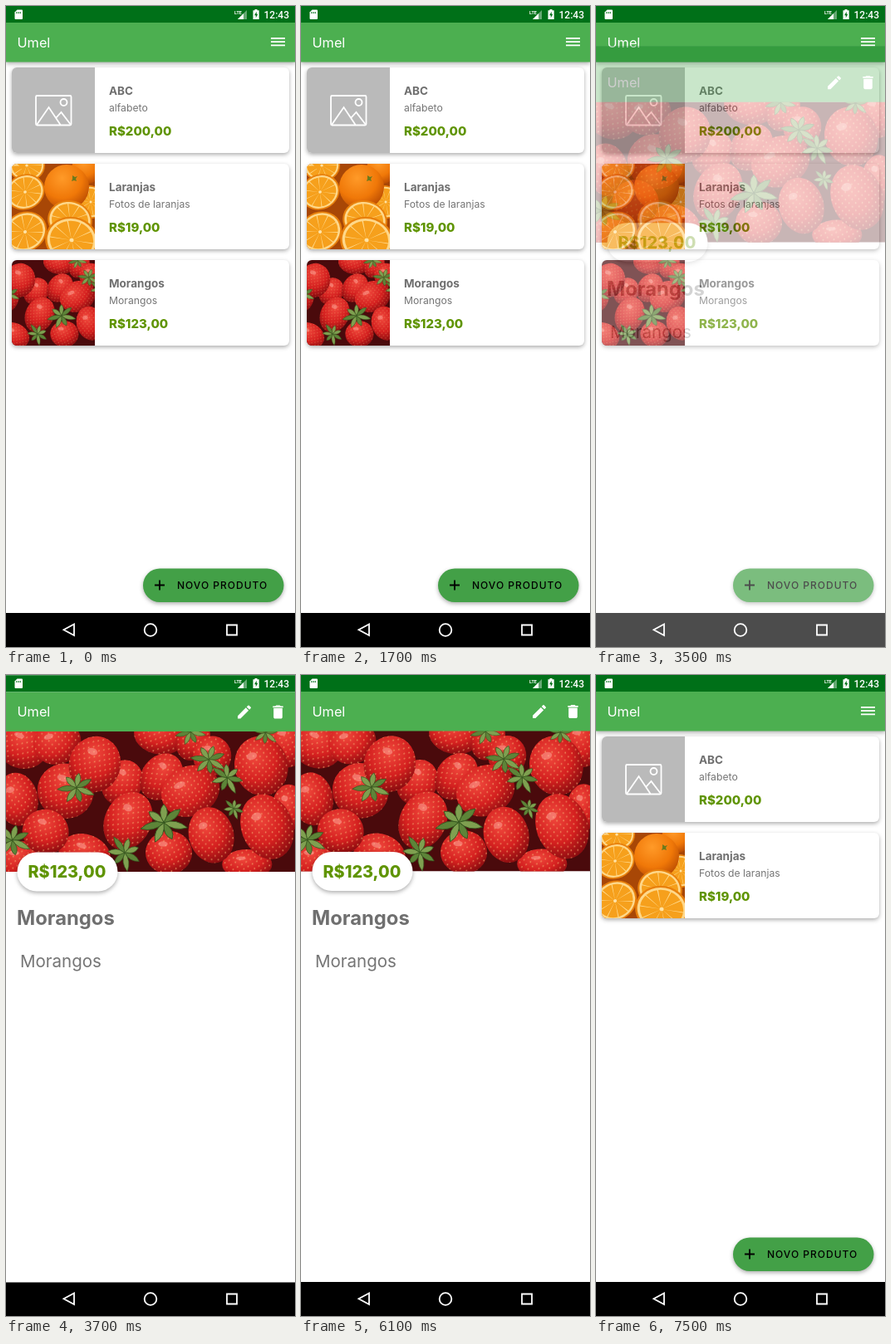
Animation of 348x772 px, one loop 8900 ms. Source, as an HTML page:

```html
<!DOCTYPE html>
<html lang="pt">
<head>
<meta charset="utf-8">
<title>Produtos</title>
<style>
html, body { margin: 0; width: 100%; height: 100%; overflow: hidden; background: #fff; }
svg { display: block; }
text { font-family: Inter, "Open Sans", sans-serif; fill: #757575; }
.brand { font-size: 16.3px; fill: #fff; }
.name { font-size: 13.5px; font-weight: 700; fill: #6f6f6f; }
.note { font-size: 12.2px; }
.price { font-size: 15px; font-weight: 800; fill: #5f9400; }
.raised { filter: drop-shadow(0 2px 2.5px rgba(0, 0, 0, .32)); }
.line { fill: none; stroke: #fff; stroke-width: 1.8; }
</style>
</head>
<body>
<svg id="stage" width="348" height="772" viewBox="0 0 348 772">
  <defs>
    <radialGradient id="red" cx=".42" cy=".32" r=".68">
      <stop offset="0" stop-color="#f0483c"/>
      <stop offset=".6" stop-color="#d4201f"/>
      <stop offset="1" stop-color="#8c0d10"/>
    </radialGradient>
    <radialGradient id="peel" cx=".4" cy=".3" r=".75">
      <stop offset="0" stop-color="#ff9a28"/>
      <stop offset=".6" stop-color="#f07808"/>
      <stop offset="1" stop-color="#b84a02"/>
    </radialGradient>
    <pattern id="seeds" width="8" height="9" patternUnits="userSpaceOnUse" patternTransform="rotate(18)">
      <g fill="#f3a96c" opacity=".7">
        <ellipse cx="2" cy="2" rx=".7" ry="1.1"/>
        <ellipse cx="6" cy="6.5" rx=".7" ry="1.1"/>
      </g>
    </pattern>
    <clipPath id="round"><rect width="334" height="103" rx="6"/></clipPath>
    <g id="berries"></g>
    <g id="oranges"></g>
    <g id="bars">
      <rect width="348" height="20" fill="#007018"/>
      <rect y="20" width="348" height="47.5" fill="#4caf50"/>
      <text class="brand" x="13.5" y="50">Umel</text>
    </g>
  </defs>

  <g id="list">
    <rect width="348" height="772" fill="#fff"/>
    <g id="cards"></g>
    <use href="#bars" class="raised"/>
    <path class="line" d="M319 39h17M319 43.2h17M319 47.4h17"/>
    <rect class="raised" x="165" y="677.5" width="169.5" height="40.5" rx="20.2" fill="#43a047"/>
    <path d="M179 697.5h12M185 691.5v12" stroke="#000" stroke-width="1.8"/>
    <text x="206" y="702" style="font-size:12px;font-weight:500;letter-spacing:1px;fill:#000">NOVO PRODUTO</text>
    <rect y="731" width="348" height="41"/>
  </g>

  <g id="detail">
    <rect id="page" width="348" height="772"/>
    <svg y="67" width="348" height="169.5" viewBox="0 0 348 169" preserveAspectRatio="xMidYMid slice"><use href="#berries"/></svg>
    <use href="#bars"/>
    <g fill="#fff">
      <path transform="translate(276.4 33.4) scale(.885)" d="M3 17.25V21h3.75L17.81 9.94l-3.75-3.75zM20.71 7.04a1 1 0 0 0 0-1.41l-2.34-2.34a1 1 0 0 0-1.41 0l-1.83 1.83 3.75 3.75z"/>
      <path transform="translate(316.9 33.4) scale(.885)" d="M6 19c0 1.1.9 2 2 2h8c1.1 0 2-.9 2-2V7H6zM19 4h-3.5l-1-1h-5l-1 1H5v2h14z"/>
      <rect class="raised" x="13.5" y="213" width="121" height="47" rx="23.5"/>
    </g>
    <text class="price" x="26.5" y="244" style="font-size:19.8px">R$123,00</text>
    <text class="name" x="13" y="301" style="font-size:23.8px">Morangos</text>
    <text x="17" y="352" style="font-size:20.5px">Morangos</text>
    <rect y="731" width="348" height="41"/>
  </g>

  <g id="system" fill="#fff">
    <path d="M13.5 4.5H19a1 1 0 0 1 1 1V15a1 1 0 0 1-1 1h-7.500a1 1 0 0 1-1-1V7.500z"/>
    <path d="M12.800 7v2.200M15 7v2.200M17.200 7v2.200" stroke="#007018"/>
    <text x="275" y="9.500" style="font:700 5.500px Roboto,sans-serif;fill:#fff">LTE</text>
    <path d="M290 5v11h-11z" opacity=".4"/>
    <path d="M286 9v7h-7z"/>
    <path d="M297.500 5.200h2v-1.200h3v1.200h2.200v10.800h-7.200z"/>
    <path d="M301.700 6.800l-2.600 4.400h1.700v3l2.500-4.400h-1.600z" fill="#007018"/>
    <text x="310.500" y="14.500" style="font:500 12px Roboto,sans-serif;fill:#fff">12:43</text>
    <path class="line" d="M82 744.500v13.500l-12.500-6.700zM266 745.500h12v12h-12z"/>
    <circle class="line" cx="174" cy="751.500" r="7.300"/>
  </g>
</svg>
<script>
const $ = id => document.getElementById(id);

// x, y, rx, ry, tilt
const berries = [
  [20, 18, 31, 27, 20], [62, 14, 29, 26, -20], [140, 62, 24, 28, 30], [185, 5, 31, 23, 10],
  [225, 10, 20, 26, 20], [248, 30, 23, 24, 0], [338, 14, 25, 30, 0], [95, 150, 32, 26, 20],
  [290, 160, 30, 18, 0], [18, 156, 32, 24, 0], [14, 82, 25, 32, -10], [340, 92, 20, 28, 0],
  [72, 72, 34, 33, 20], [187, 55, 24, 30, 35], [107, 40, 31, 34, 20], [307, 42, 32, 36, -15],
  [222, 72, 36, 30, -25], [48, 121, 28, 27, 15], [147, 108, 28, 36, 25], [247, 125, 27, 34, -15],
  [314, 115, 31, 40, -20], [196, 146, 28, 26, 0]
];
// x, y, size, tilt
const leaves = [
  [85, 68, 1.35, 10], [190, 110, 1.7, 0], [244, 34, 1.3, 20], [266, 56, 1.25, 50],
  [8, 131, 1.4, 15], [143, 146, 1.35, 70], [222, 1, 1.1, 0], [274, 93, .8, 60], [312, 2, 1, 30]
];
const leaf = ([x, y, s, a]) =>
  `<g transform="translate(${x} ${y}) rotate(${a}) scale(${s})" stroke="#35551f" stroke-width=".5">` +
  [0, 1, 2, 3, 4, 5, 6].map(i =>
    `<path d="M0 0Q5 -8 0 -${13 + i % 3 * 2}Q-5 -8 0 0" transform="rotate(${i * 51})" fill="${i % 2 ? '#5d8438' : '#7fa050'}"/>`
  ).join('') + '</g>';

$('berries').innerHTML = '<rect width="348" height="169" fill="#4a0a0c"/>' +
  berries.map(([x, y, rx, ry, a]) => {
    const shape = `<ellipse rx="${rx}" ry="${ry}"`;
    return `<g transform="translate(${x} ${y}) rotate(${a})">${shape} fill="url(#red)"/>${shape} fill="url(#seeds)"/>
      <ellipse cx="${-rx * .25}" cy="${-ry * .4}" rx="${rx * .2}" ry="${ry * .12}" fill="#ffc0b4" opacity=".4"/></g>`;
  }).join('') + leaves.map(leaf).join('');

const slice = (x, y, r, a = 0) => `<g transform="translate(${x} ${y}) rotate(${a}) scale(1 .88)">
  <circle r="${r}" fill="#e8800c"/><circle r="${r * .92}" fill="#ffd88a"/>
  <circle r="${r * .43}" fill="none" stroke="#f6a01c" stroke-width="${r * .78}" pathLength="100" stroke-dasharray="9.200 .8"/>
  <circle r="${r * .08}" fill="#ffe2a4"/></g>`;
$('oranges').innerHTML = '<rect width="100" height="103" fill="#a84706"/>' +
  slice(18, 2, 22) + slice(95, 46, 20, 80) + slice(16, 34, 24, -25) +
  '<circle cx="90" cy="6" r="18" fill="url(#peel)"/><circle cx="66" cy="28" r="27" fill="url(#peel)"/>' +
  '<path d="M73 14l3 2 3-1-2 3 1 3-3-1-3 1 1-3z" fill="#6c7a1c"/>' +
  slice(16, 82, 27, -30) + slice(70, 68, 27, 15) + slice(72, 92, 32, 10);

const blank = `<rect width="100" height="103" fill="#bababa"/>
  <g class="line"><rect x="29" y="34" width="42.500" height="35.500" rx="1.500"/><circle cx="62.500" cy="42" r="4"/>
  <path d="M30 69l14.500-21 14 21M53 61l6.500-7 11.500 15"/></g>`;
const photo = (id, box) => `<svg width="100" height="103" viewBox="0 0 ${box}" preserveAspectRatio="xMidYMid slice"><use href="#${id}"/></svg>`;
const card = ([pic, name, note, price], i) => `<g transform="translate(7 ${74 + 116 * i})">
  <rect class="raised" width="334" height="103" rx="6" fill="#fff"/><g clip-path="url(#round)">${pic}</g>
  <text class="name" x="117" y="33">${name}</text><text class="note" x="117" y="53">${note}</text>
  <text class="price" x="117" y="82">${price}</text></g>`;

$('cards').innerHTML = [
  [blank, 'ABC', 'alfabeto', 'R$200,00'],
  [photo('oranges', '100 103'), 'Laranjas', 'Fotos de laranjas', 'R$19,00'],
  [photo('berries', '348 169'), 'Morangos', 'Morangos', 'R$123,00']
].map(card).join('');
const lastCard = $('cards').lastElementChild;

const LOOP = 8900, STEP = 100, OPEN = 3483, CLOSE = 6752, RISE = 772 * .08;
const ratio = (t, from, length) => Math.min(1, Math.max(0, (t - from) / length));

function draw(t) {
  const closing = t >= CLOSE;
  const alpha = closing
    ? 1 - ratio(t, CLOSE + 100, 150)
    : 1 - (1 - ratio(t, OPEN, 200)) ** 4;
  const shift = RISE * (closing
    ? ratio(t, CLOSE, 250) ** 4
    : (1 - ratio(t, OPEN, 350)) ** 5);
  $('detail').setAttribute('opacity', alpha);
  $('detail').setAttribute('transform', `translate(0 ${shift})`);
  $('page').setAttribute('fill', closing && alpha < 1 ? '#f0eef0' : '#fff');
  lastCard.style.display = closing ? 'none' : '';
}

const start = performance.now();
function tick() {
  const t = (performance.now() - start) % LOOP;
  draw(Math.floor(t / STEP) * STEP);
  requestAnimationFrame(tick);
}
tick();
</script>
</body>
</html>
```
